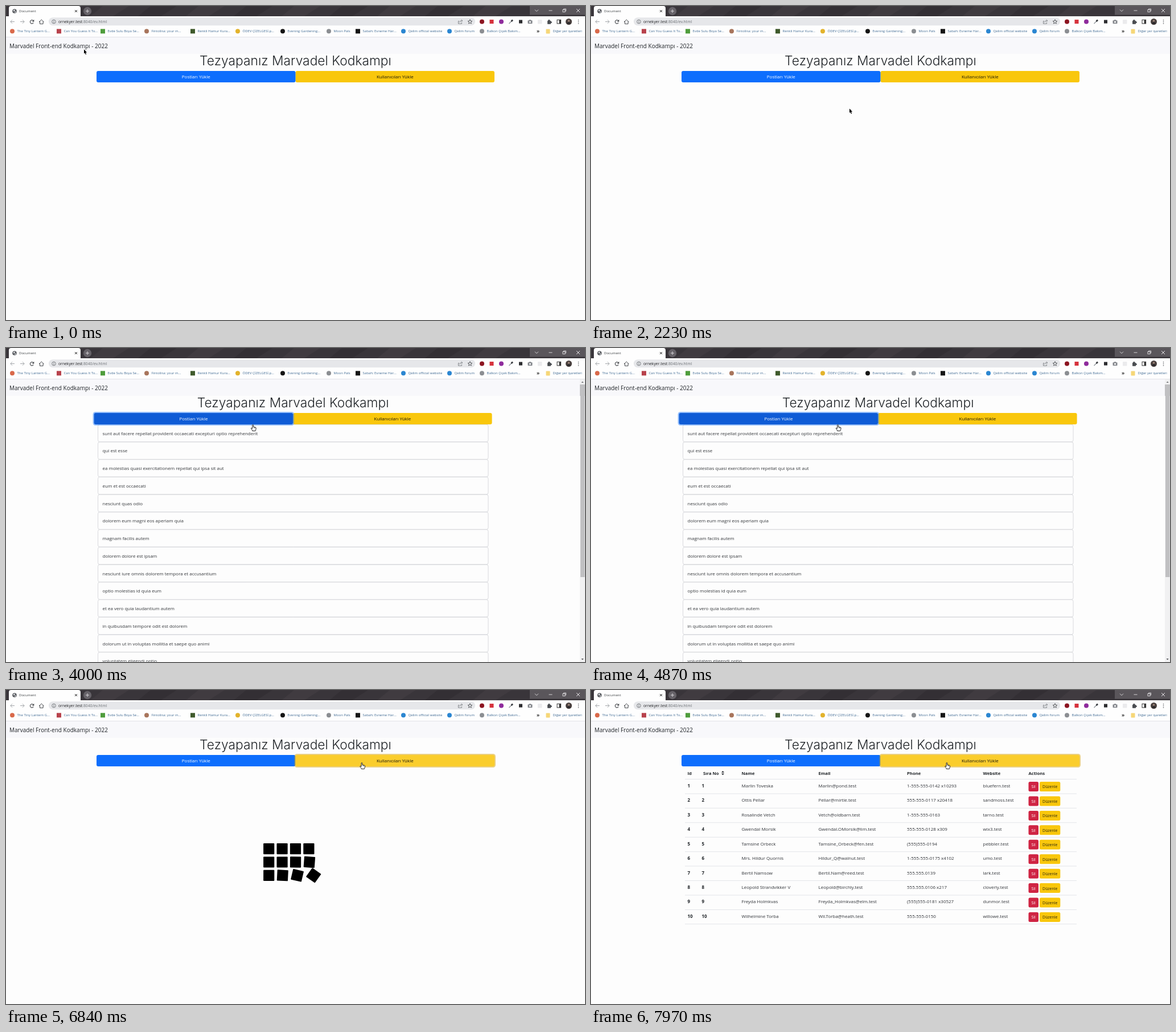
An HTML page with a canvas for the animation above (8 s loop, 1017 px wide and 551 px high).

```html
<!DOCTYPE html>
<html lang="tr">
<head>
<meta charset="utf-8">
<title>Document</title>
<style>
html, body { margin: 0; width: 100%; height: 100%; overflow: hidden; background: #fdfdfd; }
canvas { display: block; width: 1017px; height: 551px; }
</style>
</head>
<body>
<canvas id="stage" width="1017" height="551"></canvas>
<script>
const g = document.getElementById('stage').getContext('2d');
const LOOP = 8000, LOAD1 = 2520, POSTS = 3900, LOAD2 = 4965, TABLE = 7600;
const SANS = '"Open Sans", "Noto Sans", sans-serif';
const INK = '#212529', BLUE = '#0d6efd', YELLOW = '#f9c70c';

const clamp = v => Math.max(0, Math.min(1, v));
const cubic = v => (v = clamp(v), v < .5 ? 4 * v ** 3 : 1 - 4 * (1 - v) ** 3);
const smooth = v => v * v * (3 - 2 * v);

function rect(x, y, w, h, color, r = 0) {
  g.fillStyle = color;
  g.beginPath();
  g.roundRect(x, y, w, h, r);
  g.fill();
}
function disc(x, y, r, color) {
  g.fillStyle = color;
  g.beginPath();
  g.arc(x, y, r, 0, 7);
  g.fill();
}
function ring(x, y, r, color, w = 1, a = 0, b = Math.PI * 2) {
  g.strokeStyle = color;
  g.lineWidth = w;
  g.beginPath();
  g.arc(x, y, r, a, b);
  g.stroke();
}
function line(color, w, ...p) {
  g.strokeStyle = color;
  g.lineWidth = w;
  g.beginPath();
  for (let i = 0; i < p.length; i += 2) g.lineTo(p[i], p[i + 1]);
  g.stroke();
}
function poly(color, ...p) {
  g.fillStyle = color;
  g.beginPath();
  for (let i = 0; i < p.length; i += 2) g.lineTo(p[i], p[i + 1]);
  g.closePath();
  g.fill();
}
// y is the middle of the capitals
function text(s, x, y, size = 8, color = INK, weight = 400, align = 'left', font = SANS) {
  g.font = `${weight} ${size}px ${font}`;
  g.fillStyle = color;
  g.textAlign = align;
  g.fillText(s, x, y + size * .36);
}

const bookmarks = [
  [11, '#d9694a', 'The Tiny Lantern G...'], [93, '#b8424c', 'Can You Guess It To...'],
  [170, '#4f9d3c', 'Evde Sulu Boya Se...'], [247, '#a8755c', 'Fintolina: your m...'],
  [328, '#3f5a2c', 'Renkli Hamur Kura...'], [407, '#e3b32c', 'ÖDEV ÇİZELGESİ.p...'],
  [486, '#151515', 'Evening Gardening...'], [567, '#8b8e92', 'Moon Pals'],
  [618, '#151515', 'Sabah: Esneme Har...'], [698, '#2b86d1', 'Qelim official website'],
  [779, '#2b86d1', 'Qelim forum'], [836, '#8b8e92', 'Balkon Çiçek Bakım...']
];
const squareMarks = [1, 2, 4, 8];

function titleBar() {
  rect(0, 0, 1017, 18, '#39353a');
  for (let i = 0; i < 9; i++) {
    const x = 170 + i * 84;
    poly(i % 2 ? '#332f34' : '#403b40', x, 0, x + 46, 0, x + 18, 18, x - 22, 18);
  }
  rect(920, 0, 97, 15.5, '#5a565b');
  const c = '#e4e2e5';
  line(c, .9, 929, 6.5, 932, 9.5, 935, 6.5);
  line(c, .9, 953.5, 8, 959.5, 8);
  g.strokeRect(978, 6.5, 4, 4);
  line(c, .9, 979.5, 6, 979.5, 5, 983.5, 5, 983.5, 9, 982.5, 9);
  line(c, 1, 1002, 5, 1008, 11);
  line(c, 1, 1008, 5, 1002, 11);

  rect(5, 0, 126, 22, '#fefefe', 4);
  disc(15, 9, 3.8, '#55585c');
  poly('#d9dbde', 12.4, 7.5, 15.5, 6, 15.8, 8.4, 13.8, 9.8);
  poly('#d9dbde', 15.6, 10, 17.7, 8.8, 17, 11.4, 15.2, 12);
  text('Document', 23, 9, 6.1, '#3c4043');
  line('#333', 1, 121, 7, 125, 11);
  line('#333', 1, 125, 7, 121, 11);
  disc(143, 9, 7.2, '#666268');
  line('#d8d6d9', 1, 140, 9, 146, 9);
  line('#d8d6d9', 1, 143, 6, 143, 12);
}

function toolbar() {
  rect(0, 18, 1017, 36, '#fefefe');
  for (const [x, d] of [[11.5, -1], [28.5, 1]]) {
    const c = '#a3a6aa';
    line(c, 1, x - 3.5, 27.5, x + 3.5, 27.5);
    line(c, 1, x + d * .5, 24.3, x + d * 3.6, 27.5, x + d * .5, 30.7);
  }
  const c = '#44474b';
  ring(45.5, 27.7, 3.1, c, 1.1, .5, 5.6);
  poly(c, 49.3, 23.8, 49.3, 27.4, 45.8, 27.4);
  line(c, 1, 58, 28, 62.3, 24, 66.6, 28);
  line(c, 1, 59.5, 27, 59.5, 31.4, 65.1, 31.4, 65.1, 27);

  rect(75, 20.3, 749, 14, '#e6e7ea', 7);
  ring(84, 27.5, 3.3, '#5f6368', .8);
  line('#5f6368', .9, 84, 27, 84, 29.5);
  line('#5f6368', .9, 84, 25.3, 84, 26.2);
  text('ornekyer.test', 92, 27.5, 6.8, '#202124');
  text(':8040/ev.html', 92 + g.measureText('ornekyer.test').width, 27.5, 6.8, '#6b6f74');

  line('#6b6f74', .8, 796, 26.5, 794.5, 26.5, 794.5, 31, 800.5, 31, 800.5, 29);
  line('#6b6f74', .8, 796.5, 29, 798, 26.2, 801.5, 25.8);
  line('#6b6f74', .8, 799.7, 23.8, 801.8, 25.8, 799.7, 27.8);
  g.strokeStyle = '#4a4d51';
  g.lineWidth = .9;
  g.beginPath();
  for (let i = 0; i < 10; i++) {
    const a = i * Math.PI / 5 - Math.PI / 2, r = i % 2 ? 1.8 : 4;
    g.lineTo(815 + r * Math.cos(a), 27.7 + r * Math.sin(a));
  }
  g.closePath();
  g.stroke();

  disc(836, 27.5, 4, '#8c1420');
  rect(849.5, 24, 7, 7, '#d6323c');
  disc(870, 27.5, 4, '#8e2b9c');
  line('#9ba0a5', 1.6, 883.5, 31, 888, 26.5);
  line('#33363a', 2.6, 887.5, 27, 890, 24.5);
  rect(901, 24.5, 6, 6, '#2d2d30');
  rect(916.5, 25.3, 8, 5.6, '#85888d', 1);
  rect(918.8, 24.2, 3.4, 2, '#85888d');
  disc(920.5, 28, 1.6, '#fefefe');
  rect(934, 24, 7.5, 7.5, '#ebebed', 1);
  rect(951, 25.7, 6, 6, '#4a4d51', .6);
  disc(953.8, 25.2, 1.5, '#4a4d51');
  disc(957.4, 28.6, 1.5, '#4a4d51');
  g.strokeStyle = '#333';
  g.lineWidth = 1;
  g.strokeRect(968, 24.3, 6.6, 6.6);
  rect(971.6, 24.3, 3, 6.6, '#333');
  disc(988.5, 27.5, 5.5, '#49403e');
  disc(988.5, 26, 1.8, '#9b8378');
  rect(985.8, 28.6, 5.4, 3.2, '#2b292c', 1.5);
  for (const y of [24.7, 27.7, 30.7]) disc(1005.5, y, .8, '#4a4d51');

  bookmarks.forEach(([x, color, label], i) => {
    if (squareMarks.includes(i)) rect(x - 4, 40.3, 8, 8, color);
    else disc(x, 44.3, 4, color);
    text(label, x + 8.5, 44.2, 6, '#3f6a93');
  });
  text('»', 934.5, 43.5, 8.5, '#333', 700, 'center');
  rect(948.5, 40.6, 7, 8, '#f6d778', 1);
  text('Diğer yer işaretleri', 960.5, 44.2, 6, '#3f6a93');
  rect(0, 54, 1017, 1, '#e2e3e8');
}

function button(x, label, color, ink, glow) {
  if (glow) rect(x - 2, 112, 353.5, 24, glow, 4.5);
  rect(x, 114, 349.5, 20, color, 3);
  text(label, x + 174.8, 124, 8, ink, 400, 'center');
}

function page(t, mode) {
  const dx = mode === 'posts' ? -4.4 : 0;
  rect(0, 55, 1017, 29, '#f8f8fb');
  text('Marvadel Front-end Kodkampı - 2022', 6, 70, 10, INK);
  text('Tezyapanız Marvadel Kodkampı', 508.5 + dx, 96, 22.8, INK, 300, 'center', 'Inter, Lato, sans-serif');
  const first = t >= LOAD1 && t < LOAD2, second = t >= LOAD2;
  const hover = t > 2440 && t < 4900;
  const drawBlue = () => button(159 + dx, 'Postları Yükle', hover ? '#0f5cd6' : BLUE, '#fff', first && 'rgba(49,132,253,.5)');
  const drawYellow = () => button(508.5 + dx, 'Kullanıcıları Yükle', t > 4930 ? '#facd2c' : YELLOW, '#17150c', second && 'rgba(217,164,6,.5)');
  if (second) { drawBlue(); drawYellow(); }
  else { drawYellow(); drawBlue(); }
}

// Squares roll right, bottom right first, then back, top left first
function loader(age) {
  const half = 835, span = 446, step = 58, t = age % (half * 2);
  for (let r = 0; r < 3; r++) for (let c = 0; c < 4; c++) {
    const out = cubic((t - (3 - c + (2 - r) * 1.8) * step) / span);
    const back = cubic((t - half - (c + r * 1.8) * step) / span);
    const q = out - back;
    g.save();
    g.translate(461.7 + c * 23.4 + q * 21.2, 278.7 + r * 23.3);
    g.rotate(q * Math.PI / 2);
    rect(-9.6, -9.6, 19.2, 19.2, '#000', 1);
    g.restore();
  }
}

const posts = [
  'sunt aut facere repellat provident occaecati excepturi optio reprehenderit',
  'qui est esse', 'ea molestias quasi exercitationem repellat qui ipsa sit aut',
  'eum et est occaecati', 'nesciunt quas odio', 'dolorem eum magni eos aperiam quia',
  'magnam facilis autem', 'dolorem dolore est ipsam',
  'nesciunt iure omnis dolorem tempora et accusantium', 'optio molestias id quia eum',
  'et ea vero quia laudantium autem', 'in quibusdam tempore odit est dolorem',
  'dolorum ut in voluptas mollitia et saepe quo animi', 'voluptatem eligendi optio'
];

function postList() {
  posts.forEach((s, i) => {
    const y = 134.2 + i * 30.74;
    g.strokeStyle = '#d8d9dd';
    g.lineWidth = 1;
    g.beginPath();
    g.roundRect(161.5, y, 685.5, 30.4, 3);
    g.stroke();
    text(s, 169.5, y + 15.6, 8, '#34373b');
  });
  rect(1008, 55, 9, 496, '#f1f1f2');
  rect(1009, 64, 7.5, 338, '#c0c0c2');
  poly('#77787b', 1010.5, 61, 1012.6, 58.5, 1014.7, 61);
  poly('#55565a', 1010.5, 545, 1012.6, 547.5, 1014.7, 545);
}

const people = [
  ['Marlin Toveska', 'Marlin@pond.test', '1-555-555-0142 x10293', 'bluefern.test'],
  ['Ottis Pellar', 'Pellar@mirtle.test', '555-555-0117 x20418', 'sandmoss.test'],
  ['Rosalinde Vetch', 'Vetch@oldbarn.test', '1-555-555-0163', 'tarno.test'],
  ['Gwendal Morsik', 'Gwendal.OMorsik@lim.test', '555-555-0128 x309', 'wix3.test'],
  ['Tamsine Orbeck', 'Tamsine_Orbeck@fen.test', '(555)555-0194', 'pebbler.test'],
  ['Mrs. Hildur Quornis', 'Hildur_Q@walnut.test', '1-555-555-0175 x4102', 'umo.test'],
  ['Bertil Namsow', 'Bertil.Nam@reed.test', '555.555.0139', 'lark.test'],
  ['Leopold Strandvikker V', 'Leopold@birchly.test', '555.555.0106 x217', 'cloverly.test'],
  ['Freyda Holmkvas', 'Freyda_Holmkvas@elm.test', '(555)555-0181 x30527', 'dunmor.test'],
  ['Wilhelmine Torba', 'Wil.Torba@heath.test', '555-555-0150', 'willowe.test']
];
const columns = [264.5, 399.5, 555, 688.5];

function table() {
  const heads = [['Id', 169.5], ['Sıra No', 197], ['Name', 264.5], ['Email', 399.5],
    ['Phone', 555], ['Website', 688.5], ['Actions', 768.5]];
  for (const [s, x] of heads) text(s, x, 146, 7.7, INK, 700);
  poly(INK, 229, 144.8, 231.5, 142, 234, 144.8);
  poly(INK, 229, 146.4, 231.5, 149.2, 234, 146.4);
  rect(165, 156, 688, 1, '#e3e5e9');
  people.forEach((row, i) => {
    const y = 168 + i * 25.44;
    text(i + 1, 169.5, y, 8, INK, 700);
    text(i + 1, 194.5, y, 8, INK, 700);
    row.forEach((s, k) => text(s, columns[k], y, 8, '#303338'));
    rect(768.5, y - 7, 17.5, 17, '#cf2443', 2.5);
    rect(788, y - 7, 36.3, 17, YELLOW, 2.5);
    text('Sil', 777.2, y + 2, 6.9, '#fff', 400, 'center');
    text('Düzenle', 806.2, y + 2, 6.9, '#2b260f', 400, 'center');
    rect(165, y + 13.4, 688, 1, '#e3e5e9');
  });
}

// time, x, y of the pointer tip
const path = [
  [0, 137, 76], [830, 440, 188], [1650, 468, 270], [2100, 454, 180],
  [2230, 454, 180], [2470, 434, 134.5], [4880, 433.5, 134.5], [4955, 625, 127.5], [LOOP, 625, 127.5]
];

function pointer(t) {
  const i = path.findIndex(p => p[0] > t), [t0, x0, y0] = path[i - 1], [t1, x1, y1] = path[i];
  const k = smooth((t - t0) / (t1 - t0));
  g.save();
  g.translate(x0 + (x1 - x0) * k, y0 + (y1 - y0) * k);
  g.lineJoin = 'round';
  if (t < 2440) {
    const shape = [0, 0, 0, 7.6, 1.6, 6.2, 2.9, 9.2, 4.1, 8.7, 2.9, 5.8, 5.1, 5.6];
    line('#fff', 1, ...shape, 0, 0);
    poly('#000', ...shape);
  } else {
    const hand = new Path2D('M-.9 .6Q0-.6 .9 .6V4L4.6 4.7Q5.7 5 5.6 6.4L5 9.2L4.4 11H-.8L-1.5 9L-3.3 6.4Q-2.6 5.2-.9 6.8Z');
    g.fillStyle = '#fff';
    g.strokeStyle = '#111';
    g.lineWidth = .9;
    g.fill(hand);
    g.stroke(hand);
    line('#111', .6, 2.2, 4.4, 2.2, 6.2);
    line('#111', .6, 3.8, 4.8, 3.8, 6.4);
  }
  g.restore();
}

function draw(now) {
  const t = now % LOOP;
  const mode = t < LOAD1 ? 'idle' : t < POSTS ? 'load' : t < LOAD2 ? 'posts' : t < TABLE ? 'load' : 'table';
  rect(0, 0, 1017, 551, '#fdfdfd');
  titleBar();
  toolbar();
  if (mode === 'posts') postList();
  page(t, mode);
  if (mode === 'posts') rect(1008, 55, 9, 9, '#f1f1f2'), rect(1008, 64, 9, 20, '#c0c0c2'), poly('#77787b', 1010.5, 61, 1012.6, 58.5, 1014.7, 61);
  if (mode === 'load') loader(t - (t < LOAD2 ? LOAD1 : LOAD2));
  if (mode === 'table') table();
  pointer(t);
}

const start = performance.now();
function tick() {
  draw(performance.now() - start);
  requestAnimationFrame(tick);
}
tick();
</script>
</body>
</html>
```
